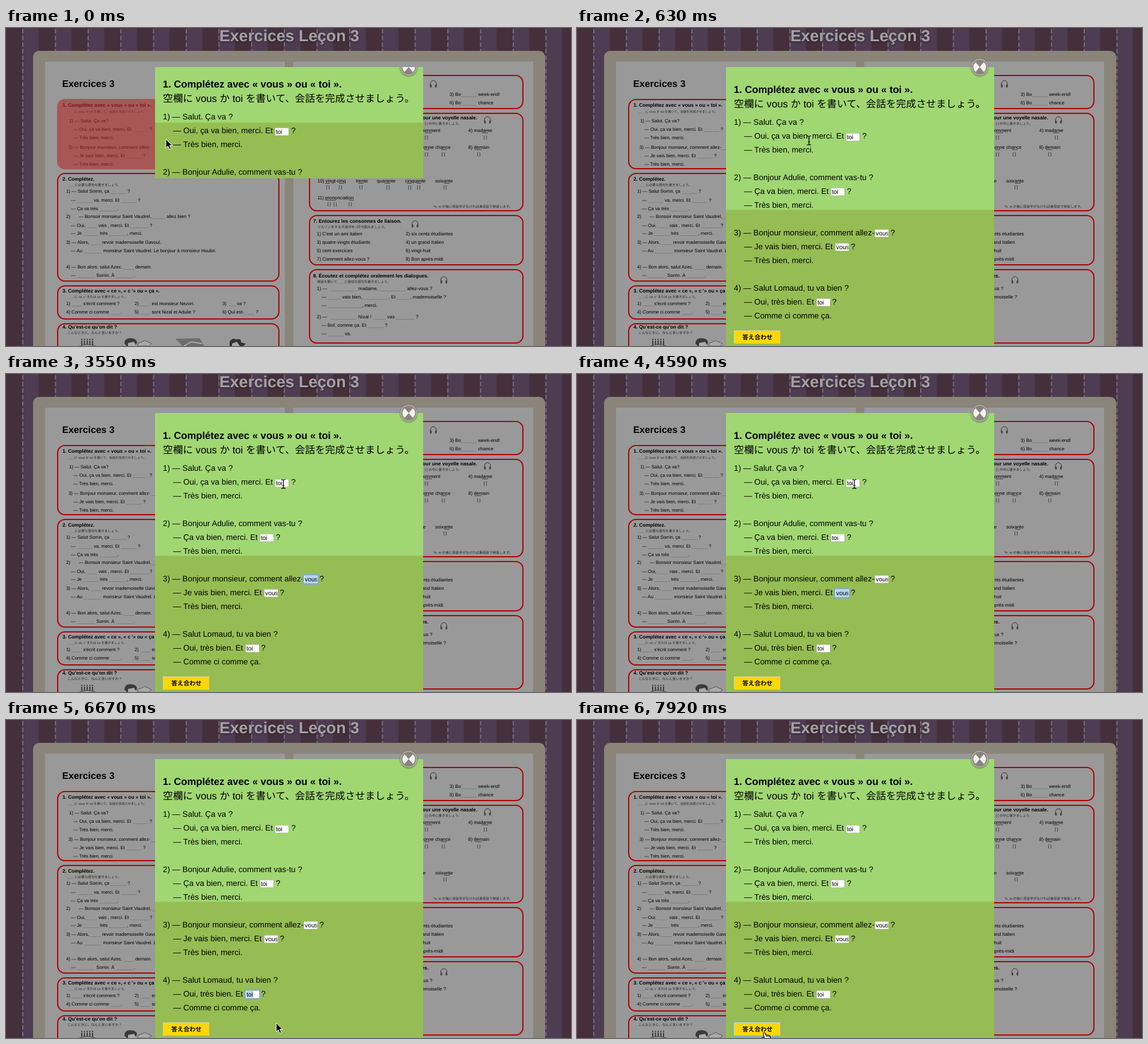
An HTML page that plays this animation: 940 by 529 pixels, repeating every 8000 ms.

```html
<!DOCTYPE html>
<html lang="ja">
<head>
<meta charset="utf-8">
<title>Exercices</title>
<style>
html, body { margin: 0; width: 100%; height: 100%; overflow: hidden; background: #442f3b; }
svg { display: block; width: 940px; height: 529px; }
svg svg { width: auto; height: auto; }
text {
  font-family: "Liberation Sans", "Noto Sans CJK JP", "Noto Sans CJK", sans-serif;
  text-rendering: geometricPrecision;
}
.b { font-weight: bold; }
.gap { fill: #666; }
</style>
</head>
<body>
<svg id="stage" viewBox="0 0 940 529" xmlns="http://www.w3.org/2000/svg"></svg>
<script>
const LOOP = 8000;
const blanks = s => s.replace(/_+/g, m => `<tspan class="gap">${m}</tspan>`);
const text = (x, y, size, s, attrs = '') =>
  `<text x="${x}" y="${y}" font-size="${size}" ${attrs}>${blanks(s)}</text>`;
const rect = (x, y, w, h, fill, attrs = '') =>
  `<rect x="${x}" y="${y}" width="${w}" height="${h}" fill="${fill}" ${attrs}/>`;
const path = (d, attrs) => `<path d="${d}" ${attrs}/>`;

const head = (x, y, s) => text(x, y, 8.27, s, 'class="b"');
const hint = (x, y, s, size = 5.3) => text(x, y, size, s, 'fill="#222"');
const rows = (size, list) => list.map(([x, y, s]) => text(x, y, size, s)).join('');
const frame = (x, y, w, h, attrs = '') =>
  rect(x, y, w, h, 'none', `rx="12" stroke="#ae0408" stroke-width="2" ${attrs}`);
const phones = (x, y) => `<g transform="translate(${x} ${y})">` +
  path('M-5 3V0A5 5.4 0 0 1 5 0V3', 'fill="none" stroke="#333" stroke-width="1"') +
  rect(-5.6, 1, 2.8, 5, '#444', 'rx="1.2"') + rect(2.8, 1, 2.8, 5, '#444', 'rx="1.2"') + '</g>';

const backdrop = () => `
  <defs>
    <pattern id="stripes" x="27" width="54.4" height="11" patternUnits="userSpaceOnUse">
      ${rect(0, 0, 54.4, 11, '#442f3b')}${rect(0, 0, 27.5, 11, '#4d3c52')}
      ${rect(.3, 2, 1.2, 7, '#958b9a')}
    </pattern>
    <filter id="soft" x="-20%" y="-40%" width="140%" height="180%">
      <feDropShadow dx="0" dy="1" stdDeviation="1.5" flood-color="#111" flood-opacity=".6"/>
    </filter>
    <clipPath id="open"><rect id="clip" x="248" y="65" width="446" height="185"/></clipPath>
  </defs>
  ${rect(0, 0, 940, 529, 'url(#stripes)')}
  ${text(355, 22, 26.67, 'Exercices Leçon 3', 'class="b" fill="#a39fa2" filter="url(#soft)"')}
  ${rect(45, 38, 852, 520, '#8a8479', 'rx="10"')}
  ${rect(65, 56, 399, 473, '#999')}${rect(478, 56, 399, 473, '#999')}`;

const leftPage = () =>
  text(93.5, 98, 15.8, 'Exercices 3', 'class="b"') +
  frame(86, 119, 368, 115, 'id="first"') + frame(86, 242, 368, 179) +
  frame(86, 429, 368, 55) + frame(86, 492, 368, 80) +
  head(94, 131, '1. Complétez avec « vous » ou « toi ».') +
  hint(102, 141, '____に vous か toi を書いて、会話を完成させましょう。', 5.2) +
  head(94, 254, '2. Complétez.') +
  hint(102, 263, '____に必要な語句を書きましょう。', 5.5) +
  head(94, 440, '3. Complétez avec « ce », « c \'» ou « ça ».') +
  hint(102, 449, '____に ce, c\' または ça を書きましょう。') +
  head(94, 500, '4. Qu\'est-ce qu\'on dit ?') +
  hint(102, 509, 'こんなときに、なんと言いますか？', 5.7) +
  rows(7.75, [
    [105, 157, '1) — Salut. Ça va?'],
    [112, 171, '— Oui, ça va bien, merci. Et ______ ?'],
    [112, 185, '— Très bien, merci.'],
    [104, 201, '3) — Bonjour monsieur, comment allez-____'],
    [112, 215, '— Je vais bien, merci. Et ______ ?'],
    [112, 229, '— Très bien, merci.'],
    [100, 274, '1) — Salut Sorrin, ça ______ ?'],
    [108, 289, '— ______ va, merci. Et ______ ?'],
    [108, 303, '— Ça va très _______.'],
    [100, 316, '2)'],
    [121, 316, '— Bonsoir monsieur Saint Vaudrel, _____ allez bien ?'],
    [108, 331, '— Oui, ____ vais , merci. Et _______ ?'],
    [108, 344, '— Je ______ très _______, merci.'],
    [100, 359, '3) — Alors, ____ revoir mademoiselle Gavoul.'],
    [108, 373, '— Au _______ monsieur Saint Vaudrel. Le bonjour à monsieur Houbri.'],
    [100, 400, '4) — Bon alors, salut Azec. ____ demain.'],
    [108, 414, '— _______ Sorrin. À _______.'],
    [100, 461, '1) ____ s\'écrit comment ?'],
    [214, 461, '2) ____ est monsieur Nezori.'],
    [360, 461, '3) ___ va ?'],
    [100, 475, '4) Comme ci comme ____.'],
    [214, 475, '5) ____ sont Nizal et Adulie ?'],
    [360, 475, '6) Qui est-____ ?']
  ]) +
  sketches();

const sketches = () => {
  const candles = [0, 1, 2, 3, 4].map(i => `M${126 + i * 4.5} 517v10`).join('');
  return path(candles, 'stroke="#333" stroke-width="1.8" stroke-dasharray="2 1 7"') +
    path('M122 529q13-5 27 0', 'fill="none" stroke="#444"') +
    path('M197 525q0-9 10-9 10 0 11 7l-3 6h-14z', 'fill="#3a3a3a"') +
    path('M203 529v-5l10-2 4 7z', 'fill="#aaa"') +
    path('M219 525l12-5 11 5-4 4h-18z', 'fill="#aaa" stroke="#444" stroke-width=".8"') +
    path('M282 517l40-1 8 13h-36z', 'fill="#6d6d6d"') +
    path('M296 529l12-7 18 3', 'fill="none" stroke="#aaa" stroke-width="2"') +
    path('M372 529v-7q4-7 11-4 9-2 8 5l8 2-4 4z', 'fill="#333"') +
    path('M376 529v-4l8-3 5 7', 'fill="#aaa"');
};

const rightPage = () =>
  frame(505, 79, 355, 55) + frame(505, 142, 355, 162) +
  frame(505, 312, 355, 82) + frame(505, 402, 355, 122) +
  phones(711, 93) + phones(801, 153) + phones(680.5, 326) + phones(728.5, 419) +
  head(692, 94, '.') +
  text(784, 152, 8.27, 'pour une voyelle nasale.', 'class="b" text-anchor="end"') +
  hint(697, 161, '[   ] の中に書きましょう。', 5.5) +
  hint(711, 299, '*n, m の後に母音字がなければ鼻母音で発音します。', 5.6) +
  head(511, 324, '7. Entourez les consonnes de liaison.') +
  hint(518, 333, 'リエゾンをする子音字を○印で囲みましょう。', 5.7) +
  head(511, 415, '8. Écoutez et complétez oralement les dialogues.') +
  hint(518, 424, '録音を聞いて____に適切な語句を書きましょう。', 5.5) +
  rows(7.9, [
    [738, 113, '3) Bo______ week-end!'],
    [738, 127, '6) Bo______ chance'],
    [690, 173, 'comment'], [769, 173, '4) madame'],
    [690, 201, 'bonne chance'], [769, 201, '8) demain'],
    [518, 257, '10) vingt-cinq'], [582, 257, 'trente'], [617, 257, 'quarante'],
    [664, 257, 'cinquante'], [714, 257, 'soixante'],
    [518, 285, '11) prononciation'],
    [517, 345, '1) C\'est un ami italien'], [665, 345, '2) six cents étudiantes'],
    [517, 359, '3) quatre-vingts étudiants'], [665, 359, '4) un grand Italien'],
    [517, 373, '5) cent exercices'], [665, 373, '6) vingt-huit'],
    [517, 387, '7) Comment allez-vous ?'], [665, 387, '8) Bon après-midi'],
    [517, 436, '1) —'], [540, 436, '__________ madame, __________ allez-vous ?'],
    [525, 450, '— _____ vais bien,__________. Et _____, mademoiselle ?'],
    [525, 464, '— _____________, merci.'],
    [517, 483, '2) —'], [540, 483, '__________ Nizal ! _____ vas _______ ?'],
    [525, 497, '— Bof, comme ça. Et ______ ?'],
    [525, 511, '— ______ va.']
  ]) +
  rows(6.5, [
    [697, 184], [795, 184], [697, 212], [725, 212], [784, 212],
    [533, 267], [554, 267], [588, 267], [633, 267], [669, 267], [684, 267], [728, 267],
    [535, 295], [545, 295], [570, 295]
  ].map(([x, y]) => [x, y, '[ ]'])) +
  path('M697 174.5h12M792 174.5h10M696 202.5h8M724 202.5h9M780 202.5h11M531 258.5h8M554 258.5h9M586 258.5h9M630 258.5h9M667 258.5h8M683 258.5h8M729 258.5h9M533 286.5h16M571 286.5h8',
    'stroke="#222" stroke-width=".7"');

const FIELDS = [
  [447, 174, 'toi'], [422, 265, 'toi'], [495, 334, 'vous'], [429, 357, 'vous'], [398, 449, 'toi']
];
const field = ([x, y, s], i) => `
  <rect id="ring${i}" x="${x - 1}" y="${y - .5}" width="26" height="16" rx="2" fill="none"
    stroke="#79abd6" stroke-width="2.4" opacity="0"/>
  <svg x="${x}" y="${y + .5}" width="24" height="14">
    ${rect(.5, .5, 23, 13, '#fff', 'stroke="#a9b394"')}
    <rect id="sel${i}" x="2" y="1.5" width="${s === 'toi' ? 11.5 : 20}" height="11" fill="#b3d4f7" opacity="0"/>
    <svg width="22.5" height="14">${text(2, 10.4, 10.3, s)}</svg>
  </svg>`;

const modal = () => `
  <g clip-path="url(#open)">
    ${rect(248, 65, 446, 476, '#a0d772')}
    <rect id="lower" x="248" width="446" height="300" fill="#95bd53"/>
    <g id="content">
      ${text(260.7, 108, 16.67, '1. Complétez avec « vous » ou « toi ».', 'class="b"')}
      ${text(261, 131.5, 16.67, '空欄に vous か toi を書いて、会話を完成させましょう。')}
      ${rows(13.333, [
        [261, 161, '1) — Salut. Ça va ?'],
        [278, 184, '— Oui, ça va bien, merci. Et'], [474.5, 184, '?'],
        [278, 207, '— Très bien, merci.'],
        [261, 253, '2) — Bonjour Adulie, comment vas-tu ?'],
        [278, 276, '— Ça va bien, merci. Et'], [449, 276, '?'],
        [278, 299, '— Très bien, merci.'],
        [261, 345, '3) — Bonjour monsieur, comment allez-'], [521.5, 345, '?'],
        [278, 368, '— Je vais bien, merci. Et'], [455.5, 368, '?'],
        [278, 391, '— Très bien, merci.'],
        [261, 437, '4) — Salut Lomaud, tu va bien ?'],
        [278, 460, '— Oui, très bien. Et'], [424.5, 460, '?'],
        [278, 483, '— Comme ci comme ça.']
      ])}
      ${FIELDS.map(field).join('')}
      <rect id="caret" x="460" y="176" width="1" height="10"/>
      <rect id="ring5" x="260" y="502" width="79" height="25" rx="2" fill="none"
        stroke="#79b6c4" stroke-width="2.6" opacity="0"/>
      ${rect(261, 503, 78, 23, '#ffd800')}
      ${path('M261.5 526v-22.5h77', 'fill="none" stroke="#d8d3a4"')}
      ${path('M261 525.5h77.5v-22', 'fill="none" stroke="#b3ab84"')}
      ${text(275, 518, 10.1, '答え合わせ', 'class="b"')}
    </g>
    <g transform="translate(670 65)">
      <circle r="13" fill="#8b837e" stroke="#b4b0aa" stroke-width="1.5" filter="url(#soft)"/>
      ${path('M0 0L-6.8-8A10.5 10.5 0 0 0-6.8 8ZM0 0L6.8-8A10.5 10.5 0 0 1 6.8 8Z', 'fill="#f4f3f0"')}
    </g>
  </g>`;

const cursors = () => `
  <g id="arrow">${path('M0 0V14.5L3.4 11.4 5.8 17 8.6 15.8 6.2 10.4H10.6Z',
    'fill="#000" stroke="#fff" stroke-width="1" stroke-linejoin="round"')}</g>
  <g id="beam">${path('M-3.5-7.5Q0-7.5 0-5.5 0-7.5 3.5-7.5M0-5.5V5.5M-3.5 7.5Q0 7.5 0 5.5 0 7.5 3.5 7.5M-1.8 2.5H1.8',
    'fill="none" stroke="#000" stroke-width="1.2"')}</g>
  <g id="hand">${path('M2 1Q3.5-1 5 1L6.5 4.5Q8 3 9 4.6 10.5 3.4 11.4 5.2 13 4.6 13.4 6.6L14 11V16H4L0 9.5Q0 7 3.5 8.5Z',
    'fill="#fff" stroke="#000" stroke-width="1.1"')}${path('M7 5l1 3M9.4 5l.8 3M11.7 5.6l.5 2.6',
    'stroke="#000" stroke-width=".8"')}</g>`;

const stage = document.getElementById('stage');
stage.innerHTML = backdrop() + leftPage() + rightPage() +
  rect(85, 118, 370, 117, '#b42a2a', 'id="hover" rx="13" fill-opacity=".6"') + modal() + cursors();

const $ = id => document.getElementById(id);
const set = (id, name, value) => $(id).setAttribute(name, value);
const show = (id, on) => set(id, 'visibility', on ? 'visible' : 'hidden');

// Each table holds [start, ...values]; a step lasts until the next one.
const POINTER = [
  [0, 'arrow', 266, 185], [210, 'beam', 276.5, 187], [630, 'beam', 386, 187],
  [840, 'beam', 437, 206], [1040, 'beam', 456, 188], [1250, 'beam', 461.5, 183],
  [5840, 'beam', 460.5, 285], [6050, 'beam', 458, 334], [6260, 'beam', 457, 392],
  [6470, 'beam', 457, 450], [6670, 'arrow', 449.5, 504], [6880, 'arrow', 371, 512],
  [7090, 'hand', 311, 521], [7300, 'hand', 309, 521], [7500, 'hand', 308, 520]
];
const SIZE = [[0, 185, -9], [210, 457, -1], [420, 475, 0]];
const FOCUS = [[0, -1], [1460, 0], [2920, 1], [3550, 2], [4590, 3], [5430, 4], [7920, 5]];
const CARET = [[0, 0], [1460, 1], [2090, 0], [2500, 1], [2920, 0]];
const at = (table, t) => table.filter(row => row[0] <= t).pop().slice(1);

function draw(t) {
  const [height, shift] = at(SIZE, t);
  const top = t < 420 ? 65 : 0;
  set('clip', 'y', top);
  set('clip', 'height', 65 + height - top);
  set('lower', 'y', 65 + height / 2);
  set('content', 'transform', `translate(0 ${shift})`);
  show('hover', t < 210);
  show('first', t >= 210);

  const [focus] = at(FOCUS, t);
  for (let i = 0; i < 6; i++) {
    set('ring' + i, 'opacity', i === focus ? .85 : 0);
    if (i < 5) set('sel' + i, 'opacity', i && i === focus ? 1 : 0);
  }
  set('caret', 'opacity', at(CARET, t)[0]);

  const [kind, x, y] = at(POINTER, t);
  for (const id of ['arrow', 'beam', 'hand']) show(id, id === kind);
  set(kind, 'transform', `translate(${x} ${y})`);
}

const start = performance.now();
function tick() {
  draw((performance.now() - start) % LOOP);
  requestAnimationFrame(tick);
}
tick();
</script>
</body>
</html>
```
